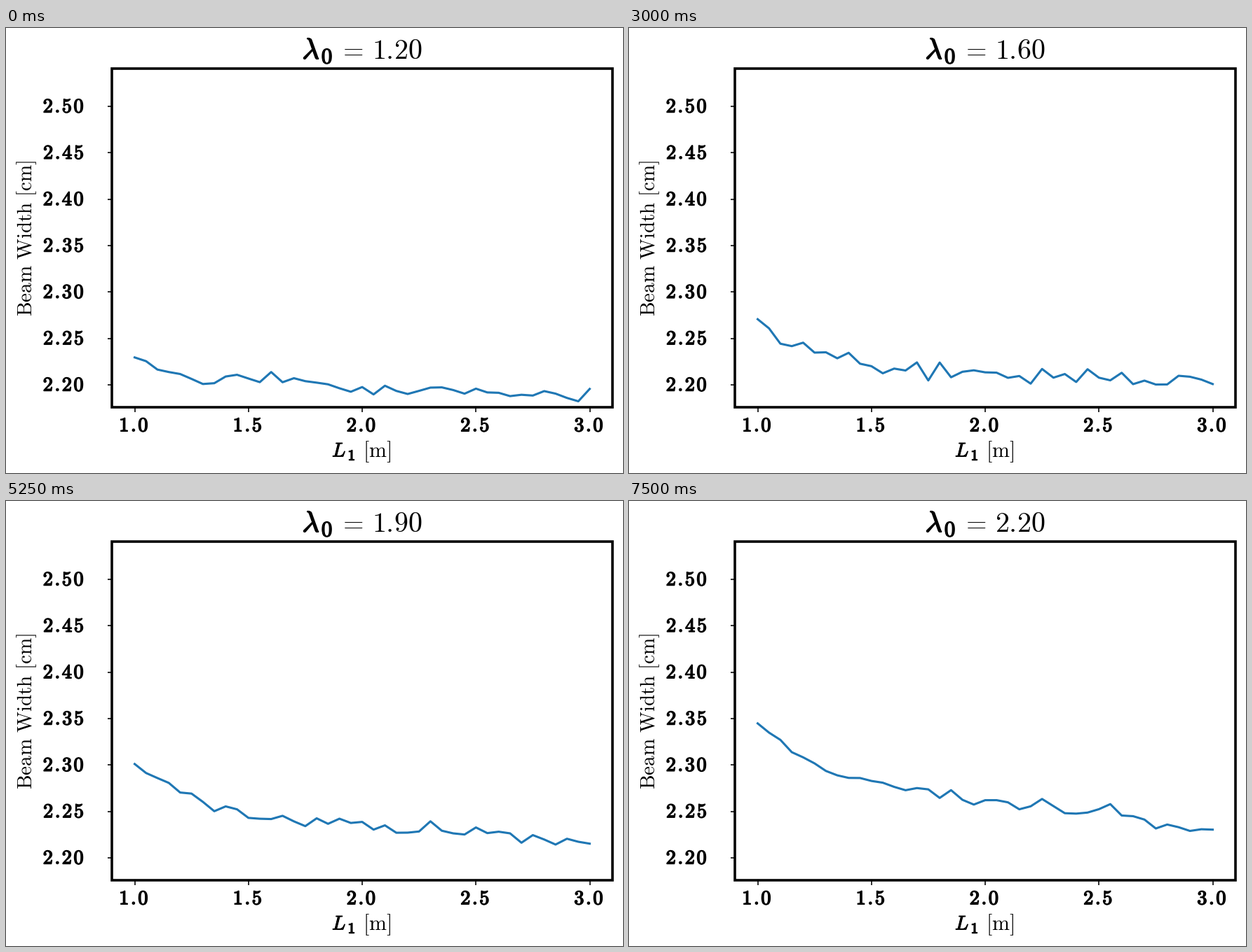
Write a matplotlib script that moves like this. It is 880 px wide and 636 px high and loops after 8 s.

```python
import numpy as np
import matplotlib.pyplot as plt
from matplotlib.animation import FuncAnimation
from matplotlib.patches import Rectangle
from matplotlib.patheffects import withStroke

plt.rcParams["mathtext.fontset"] = "cm"

W, H, DPI = 880, 636, 100
PX = 72 / DPI
STEP_MS, TICK_MS, LOOP_MS = 750, 250, 8000

LEFT, RIGHT, TOP, BOTTOM = 151, 865, 58, 542
X = np.linspace(183.5, 832.5, 41)

# Key points of the falling trend: (sample, height, slope, bend),
# where the last two describe the rise with each step of lambda.
KEYS = np.array([
    (0, 470, 11, 0.35),
    (4, 498, 7, 0.6),
    (10, 505, 3, 0.7),
    (20, 514, 2, 0.6),
    (30, 522, 3, 0.5),
    (40, 524, 5, 0),
])
NOISE = 6.5


def curve(step):
    sample, height, slope, bend = KEYS.T
    levels = height - slope * step - bend * step ** 2
    trend = np.interp(np.arange(X.size), sample, levels)
    jitter = np.random.default_rng(step).normal(0, NOISE, X.size)
    return np.minimum(trend + jitter, BOTTOM - 0.5)


def spaced(number):
    """Digits with the looser spacing of an extended bold face."""
    parts = []
    for ch in number[:-1]:
        gap = -0.1 if ch == "." else 0.1
        parts.append(r"\mathbf{%s}\hspace{%.2f}" % (ch, gap))
    return "$" + "".join(parts) + r"\mathbf{%s}$" % number[-1]


def roman(text):
    return r"$\mathrm{%s}$" % text.replace(" ", r"\ ")


fig = plt.figure(figsize=(W / DPI, H / DPI), dpi=DPI, facecolor="white")
ax = fig.add_axes([0, 0, 1, 1])
ax.set_xlim(0, W)
ax.set_ylim(H, 0)
ax.axis("off")


def label(x, y, text, size, ha="center", va="baseline", stroke=0, **kw):
    t = ax.text(x, y, text, fontsize=size * PX, ha=ha, va=va,
                color="black", **kw)
    if stroke:
        t.set_path_effects([withStroke(linewidth=stroke * PX,
                                       foreground="black")])
    return t


def bold(x, y, number, size=28.4, ha="center"):
    return label(x, y, spaced(number), size, ha=ha, stroke=1.5)


def tick(xs, ys):
    ax.plot(xs, ys, color="black", lw=1.6 * PX, solid_capstyle="butt")


line, = ax.plot(X, curve(0), color="#1f77b4", lw=3.1 * PX, zorder=2)
ax.add_patch(Rectangle((LEFT, TOP), RIGHT - LEFT, BOTTOM - TOP, fill=False,
                       ec="black", lw=3.6 * PX, zorder=3))

for k in range(7):
    y = 112 + k * 398 / 6
    tick([144.5, LEFT], [y, y])
    bold(111.5, y + 8.6, f"{2.5 - 0.05 * k:.2f}", ha="right")

for k in range(5):
    x = X[10 * k]
    tick([x, x], [BOTTOM, 549])
    bold(x - 1.2, 576.4, f"{1 + 0.5 * k:.1f}")

label(29.5, 300.5, roman("Beam Width [cm]"), 29.2, va="center", rotation=90)

label(465, 612.6, "$L$", 28.4, ha="left", stroke=1)
bold(493, 617.6, "1", 21)
label(529.5, 612.6, roman("[m]"), 30)

label(435, 44, r"$\lambda$", 42, stroke=1.6)
bold(458, 50.5, "0", 31)
label(492.5, 43, "$=$", 38)
value = label(521.5, 44, roman("1.20"), 40, ha="left")


def update(frame):
    step = frame * TICK_MS // STEP_MS
    line.set_ydata(curve(step))
    value.set_text(roman(f"{1.2 + 0.1 * step:.2f}"))
    return line, value


anim = FuncAnimation(fig, update, frames=LOOP_MS // TICK_MS,
                     interval=TICK_MS, repeat=True, repeat_delay=0)
plt.show()
```
